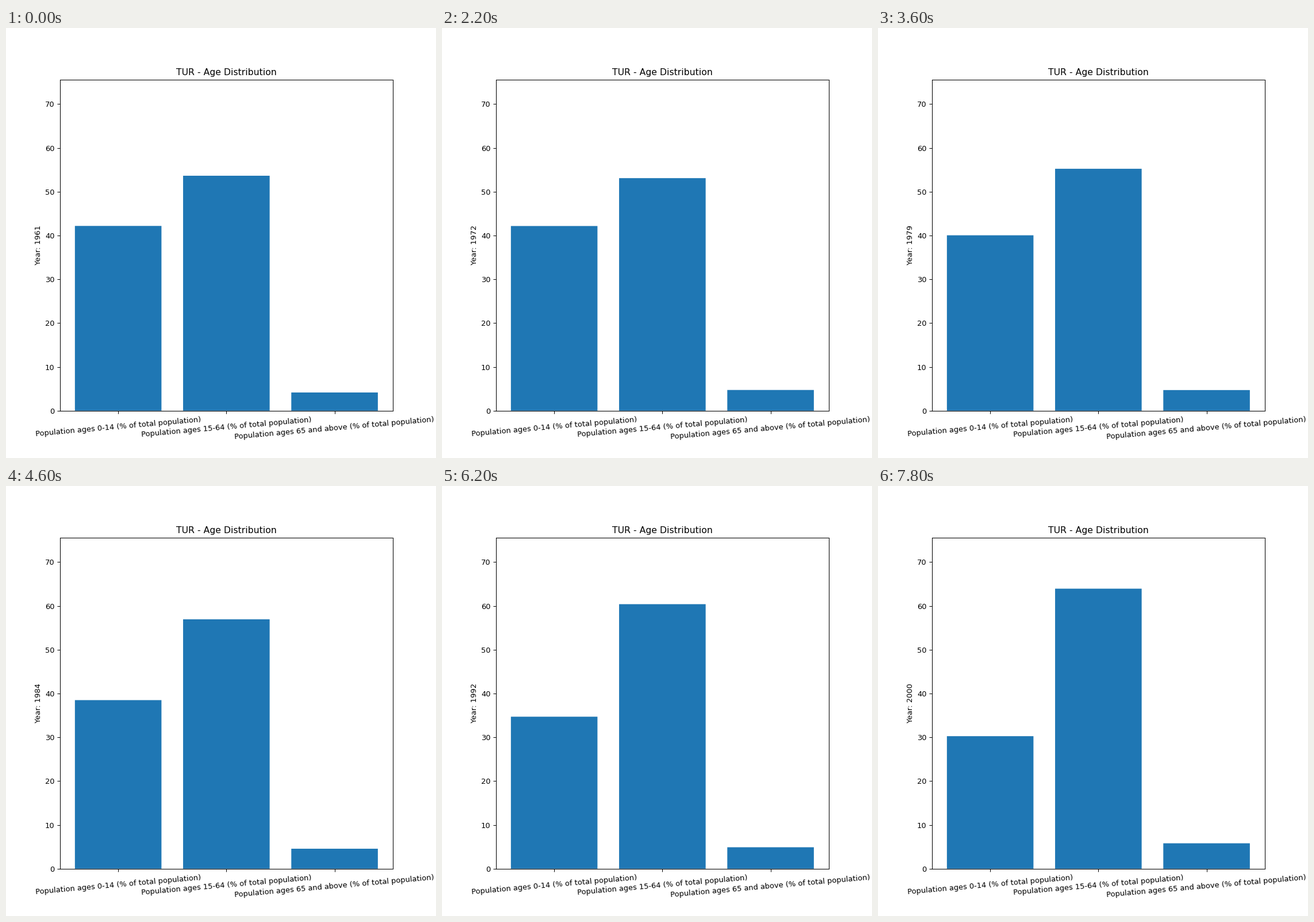
A matplotlib script that plays this animation: 748 px wide and 748 px high, repeating every 8000 ms.

```python
import numpy as np
import matplotlib.pyplot as plt
from matplotlib.animation import FuncAnimation

FIRST, LAST = 1961, 2000
GROUPS = ["0-14", "15-64", "65 and above"]

# A few turning points; the years between follow a smooth curve
YEARS = np.array([1961, 1967, 1979, 1985, 1991, 2000])
WORKING = np.array([53.65, 52.54, 55.24, 57.33, 59.96, 63.94])
SENIOR = np.array([4.16, 4.58, 4.71, 4.56, 4.82, 5.80])


def smooth(year, values):
    """Cubic Hermite curve through the turning points."""
    slope = np.gradient(values, YEARS, edge_order=2)
    i = min(np.searchsorted(YEARS, year, side="right"), len(YEARS) - 1) - 1
    h = YEARS[i + 1] - YEARS[i]
    t = (year - YEARS[i]) / h
    ease = t * t * (3 - 2 * t)
    bend = t * (1 - t) * ((1 - t) * slope[i] - t * slope[i + 1])
    return values[i] + ease * (values[i + 1] - values[i]) + h * bend


def shares(year):
    working, senior = smooth(year, WORKING), smooth(year, SENIOR)
    return 100 - working - senior, working, senior


fig, ax = plt.subplots(figsize=(8, 8), dpi=93.5)
labels = [f"Population ages {g} (% of total population)" for g in GROUPS]
bars = ax.bar(labels, shares(FIRST), color="#1f77b4", snap=False)
ax.set_ylim(0, 75.6)
ax.set_title("TUR - Age Distribution")
ax.tick_params(axis="x", rotation=5)


def update(frame):
    year = FIRST + frame
    for bar, share in zip(bars, shares(year)):
        bar.set_height(share)
    ax.set_ylabel(f"Year: {year}")
    return list(bars)


anim = FuncAnimation(fig, update, frames=LAST - FIRST + 1, interval=200,
                     repeat=True, repeat_delay=0, blit=False)
plt.show()
```
